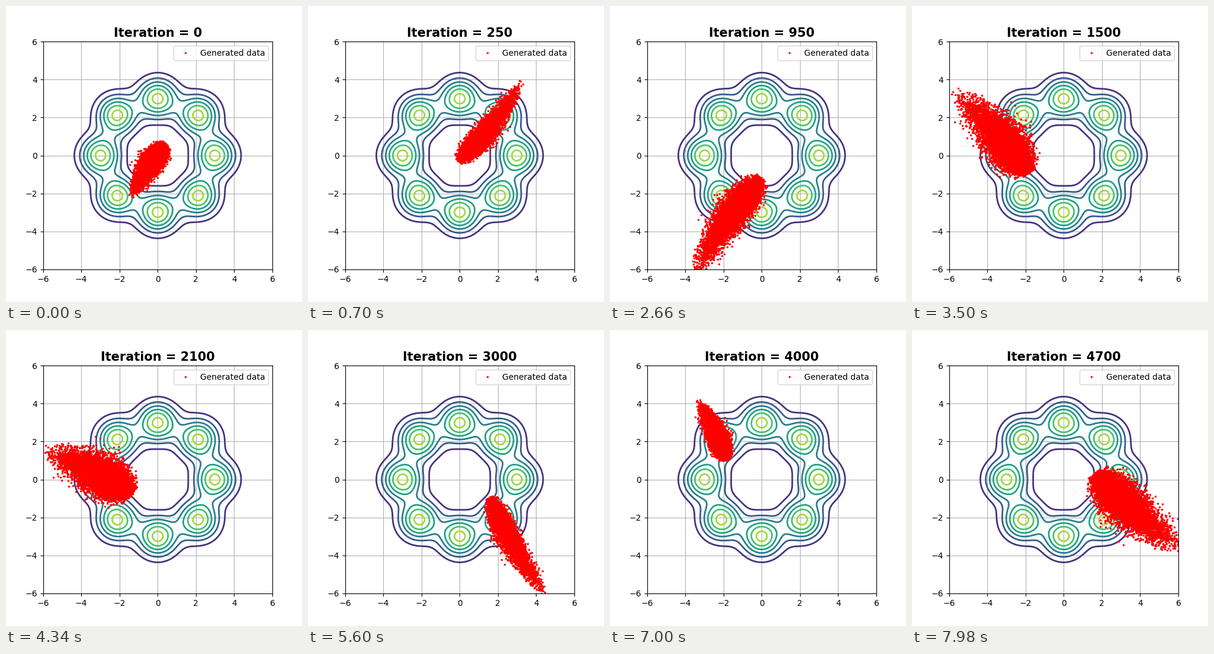
Write a matplotlib script that moves like this. It is 500 by 500 pixels and loops after 8 s.

```python
import numpy as np
import matplotlib.pyplot as plt
from matplotlib.animation import FuncAnimation

TICK, LOOP, STEP = 20, 8000, 140   # ms
MODES = 3 * np.exp(1j * np.arange(8) * np.pi / 4)
VAR = 0.5
SPIN = np.radians(35)   # typical turn of the cloud per step
BEND = 0.35 - 0.08j     # control point of the spine, relative to tip and tail

# step, tip, tail, half width of the cloud
KEYS = [
    (0, 0.45 + 0.6j, -1.5 - 2.4j, 0.65),
    (12, -0.4 - 0.4j, 2.2 - 9j, 0.6),
    (25, -1.9 - 1j, -6.1 + 3.7j, 1.25),
    (31, -1.35 - 0.8j, -6.4 + 1.7j, 1.25),
    (40, 1.6 - 0.9j, 4.8 - 6.5j, 0.65),
    (50, -1.9 + 1j, -3.5 + 4.4j, 0.6),
    (57, 1.65 + 0.4j, 6.7 - 4j, 1.25),
]
steps, tips, tails, widths = map(np.array, zip(*KEYS))

# headings always grow, by whole extra turns where that suits the spin best
headings = np.angle(tips + 0.3 * (tails - tips))
gaps = np.diff(headings) % (2 * np.pi)
gaps += 2 * np.pi * np.round((SPIN * np.diff(steps) - gaps) / (2 * np.pi))
headings = headings[0] + np.append(0, np.cumsum(gaps))
tips = tips * np.exp(-1j * headings)
tails = tails * np.exp(-1j * headings)

rng = np.random.default_rng(4)
COUNT = 8000
along = rng.beta(2, 3.5, COUNT)
across = rng.normal(0, 1 / 2.6, COUNT) * (0.35 + 0.65 * np.sin(np.pi * along ** 0.8))
spine = 2 * along * (1 - along) * BEND + along ** 2
slope = (1 - along) * BEND + along * (1 - BEND)
normal = 1j * slope / abs(slope)


def density(x, y):
    z = x + 1j * y
    bumps = sum(np.exp(-abs(z - m) ** 2 / (2 * VAR)) for m in MODES)
    return bumps / (2 * np.pi * VAR)


def cloud(step):
    """Samples spread around a bent spine that turns about the origin."""
    def at(values):
        return np.interp(step, steps, values)

    tip, axis = at(tips), at(tails) - at(tips)
    side = axis / abs(axis) * normal
    return (tip + axis * spine + at(widths) * side * across) * np.exp(1j * at(headings))


def iteration(step):
    return 50 * step if step <= 20 else 100 * (step - 10)


fig, ax = plt.subplots(figsize=(5, 5), dpi=100)
X, Y = np.meshgrid(*[np.linspace(-6, 6, 200)] * 2)
ax.contour(X, Y, density(X, Y), levels=np.arange(8) * 0.05,
           cmap="viridis", linewidths=2)
dots, = ax.plot([], [], "r.", markersize=3, label="Generated data")
ax.set(xlim=(-6, 6), ylim=(-6, 6))
ax.grid(True)
ax.legend(loc="upper right")
title = ax.set_title("", fontsize=15, fontweight="bold")


def draw(frame):
    step = frame * TICK // STEP
    z = cloud(step)
    dots.set_data(z.real, z.imag)
    title.set_text(f"Iteration = {iteration(step)}")
    return dots, title


anim = FuncAnimation(fig, draw, frames=LOOP // TICK, interval=TICK,
                     repeat=True, repeat_delay=0, cache_frame_data=False)
plt.show()
```
